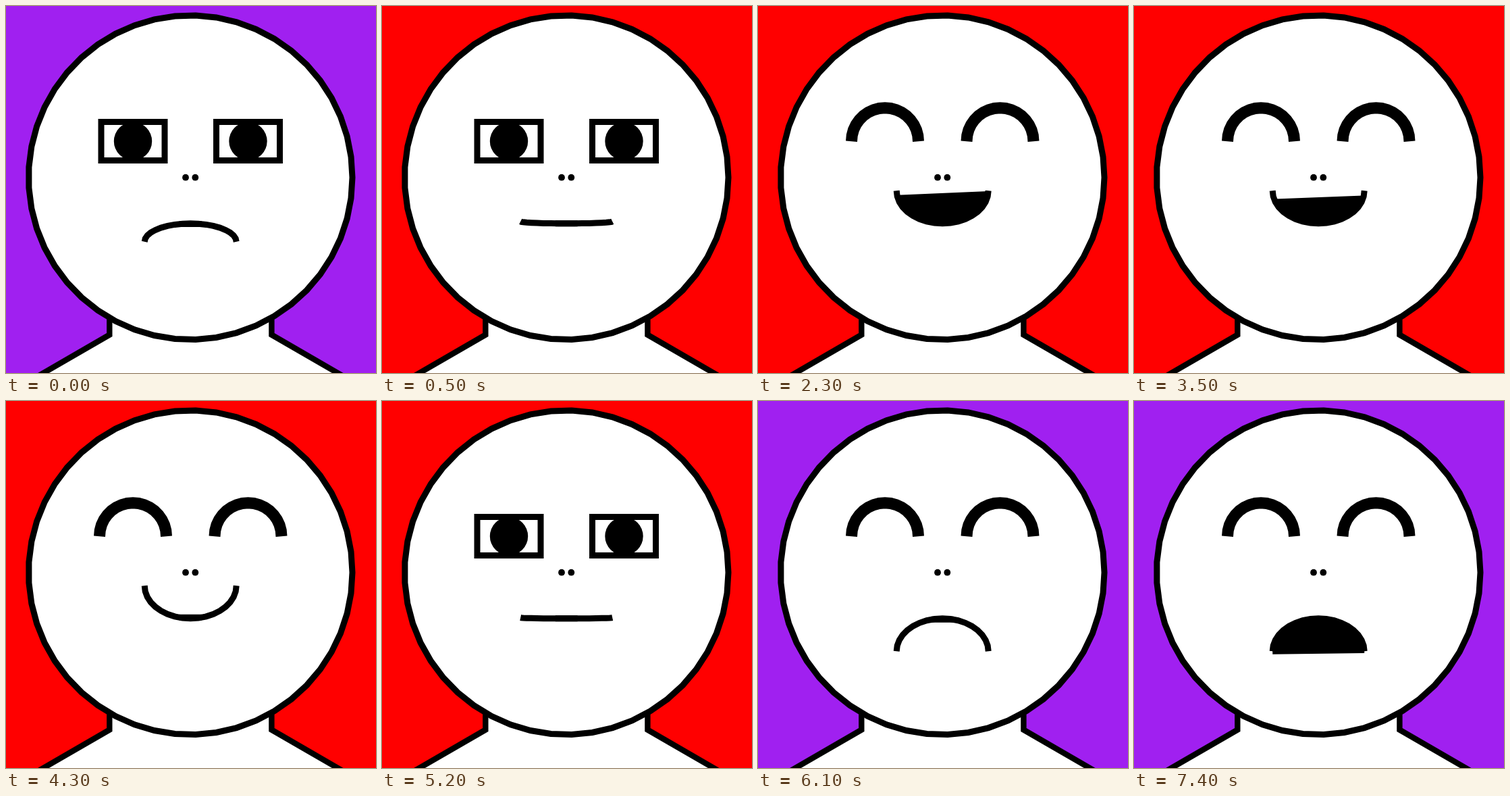
Animation, 548 px wide and 543 px high, one loop 8000 ms. Source, as an HTML page with a canvas:

```html
<!DOCTYPE html>
<html lang="en">
<head>
<meta charset="utf-8">
<title>Mood face</title>
<style>
  html, body { margin: 0; width: 100%; height: 100%; overflow: hidden; }
  canvas { display: block; }
</style>
</head>
<body>
<canvas id="stage" width="548" height="543"></canvas>
<script>
const ctx = document.getElementById('stage').getContext('2d');
const LOOP = 8000, TICK = 100, RAD = Math.PI / 180;
const MAX_BEND = 48.5, MAX_FILL = 11, PEN = 9;
const MOUTH = { x: 273.2, y: 321.8, rx: 68 };

const clamp = (v, lo, hi) => Math.max(lo, Math.min(hi, v));

// Mouth bend: rises into a smile, holds, then falls into a frown
function bendAt(n) {
  const rise = 6 * n - 27, fall = MAX_BEND - 5.9 * (n - 44);
  return clamp(Math.min(rise, fall), -MAX_BEND, MAX_BEND);
}

// Mouth fill: the smile opens and closes, later the frown opens
function fillAt(n) {
  const smile = Math.min(n - 14, 43 - n), frown = n - 62;
  return clamp(Math.max(smile, frown), 0, MAX_FILL);
}

// Points along an ellipse between two angles in degrees
function arcPoints(x, y, rx, ry, from, to, count) {
  return Array.from({ length: count + 1 }, (_, i) => {
    const a = (from + (to - from) * i / count) * RAD;
    return [x + rx * Math.cos(a), y + ry * Math.sin(a)];
  });
}

function path(points, closed) {
  ctx.beginPath();
  points.forEach(p => ctx.lineTo(...p));
  if (closed) ctx.closePath();
}

function line(points, width, closed) {
  path(points, closed);
  ctx.lineWidth = width;
  ctx.stroke();
}

function fill(points, color) {
  path(points, true);
  ctx.fillStyle = color;
  ctx.fill();
}

function dot(x, y, r) {
  ctx.beginPath();
  ctx.arc(x, y, r, 0, 2 * Math.PI);
  ctx.fillStyle = '#000';
  ctx.fill();
}

function drawShoulder(x, side) {
  const points = [[x, 450], [x, 486.5], [x + side * 120, 555.8]];
  fill([...points, [273, 555.8], [273, 450]], '#fff');
  line(points, 8.4);
}

function drawHead() {
  const rim = arcPoints(273.2, 253.7, 239.8, 239.8, 0, 360, 49).slice(0, -1);
  fill(rim, '#fff');
  line(rim, PEN, true);
  dot(266, 253.7, 4.9);
  dot(280.3, 253.7, 4.9);
}

function drawEye(x, closed) {
  if (closed) {
    line(arcPoints(x, 200.2, 49.5, 49.5, 180, 360, 18), 17);
  } else {
    ctx.lineWidth = PEN;
    ctx.strokeRect(x - 47, 171.5, 94, 57);
    dot(x, 200, 28.2);
  }
}

function drawMouth(bend, level) {
  const { x, rx } = MOUTH, y = MOUTH.y - bend;
  line(arcPoints(x, y, rx, bend, 180, 0, 18), PEN);
  const left = 180 - Math.max(0, 76 - 7 * level);
  const right = Math.max(2, 76 - 7.75 * level);
  const lip = arcPoints(x, y, rx, bend, left, right, 24);
  fill(lip, '#000');
  line([lip[0], lip[24]], PEN);
}

function draw(time) {
  const n = Math.floor(time % LOOP / TICK);
  const bend = bendAt(n);
  const closed = Math.abs(bend) > 40;
  ctx.fillStyle = bend > 0 ? '#f00' : '#a020f0';
  ctx.fillRect(0, 0, 548, 543);
  drawShoulder(153.3, -1);
  drawShoulder(393.4, 1);
  drawHead();
  drawEye(188, closed);
  drawEye(358.5, closed);
  drawMouth(bend, fillAt(n));
}

const start = performance.now();
function frame() {
  draw(performance.now() - start);
  requestAnimationFrame(frame);
}
frame();
</script>
</body>
</html>
```
